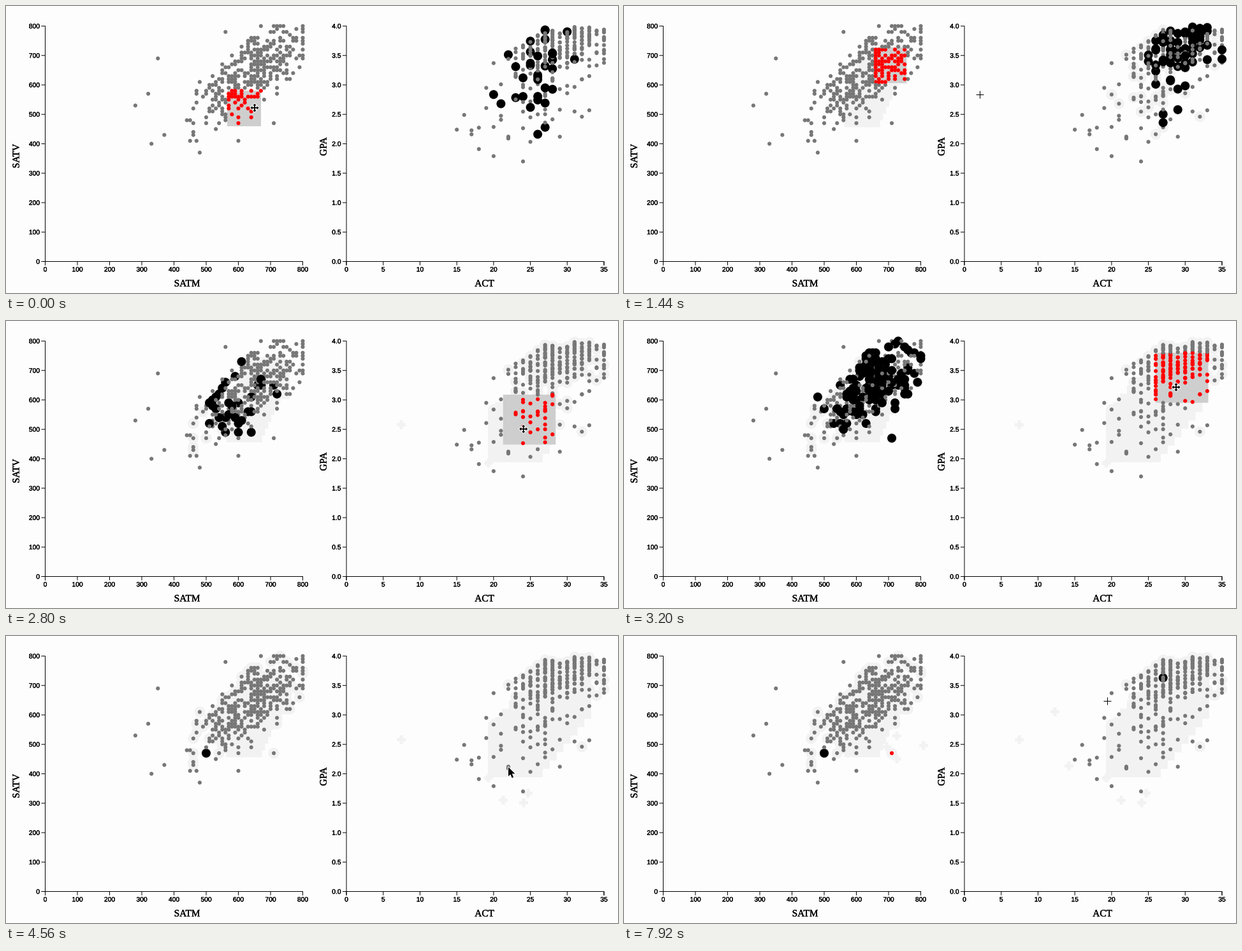
A matplotlib script for the animation above (8000 ms loop, 960x451 px).

```python
import numpy as np
import matplotlib.pyplot as plt
from matplotlib.animation import FuncAnimation
from matplotlib.collections import LineCollection, PolyCollection
from matplotlib.patheffects import withStroke

W, H, DPI = 960, 451, 100
FRAMES, STEP = 100, 80
PT = 72 / DPI
GRAY, RED, BLACK, GHOST, BRUSH = "#777777", "#ff0000", "#000000", "#f2f2f2", "#cecece"
TOP, BOTTOM, SPAN = 31.5, 401.5, 404
LEFT_X, RIGHT_X = 61.5, 534
plt.rcParams["text.hinting"] = "no_hinting"

# ---- data: satm, satv, act, gpa; the first three get hovered ----
KEY_STUDENTS = [
    (500, 470, 22, 2.10), (720, 570, 30, 3.67), (710, 470, 27, 3.63),
    (280, 530, 15, 2.24), (320, 570, 16, 2.49), (330, 400, 17, 2.16), (370, 430, 18, 1.91),
    (350, 690, 20, 3.37), (480, 370, 20, 1.79), (450, 410, 24, 1.70), (600, 410, 29, 2.12),
    (560, 780, 34, 3.54), (640, 490, 27, 2.28), (650, 670, 32, 2.46), (760, 620, 33, 3.15),
]


def students(n, seed=4):
    """Test scores and grades that share one latent ability."""
    rng = np.random.default_rng(seed)
    z, a, b, c = rng.normal(size=(4, 2 * n))
    z = np.where(z < 0, 1.2 * z, z)
    sat = 635 + 85 * (0.83 * z + 0.56 * np.array([a, b]))
    satm, satv = np.minimum(800, sat.round(-1))
    act = np.minimum(35, (28.3 + 3.7 * (0.85 * z + 0.5 * c)).round())
    cap = np.minimum(4, 3.37 + 0.085 * (act - 20))
    gpa = cap - rng.gamma(1.6, 0.3, 2 * n) * np.exp(-0.25 * z)
    ok = (satm >= 430) & (satv >= 410) & (abs(satm - satv) < 140) & (act >= 17) & (gpa > 2)
    rows = np.column_stack([satm, satv, act, gpa])[ok]
    first = np.unique(rows[:, :2], axis=0, return_index=True)[1]
    return rows[np.sort(first)][:n]


def to_px(x, y, x0, xmax, ymax):
    return np.column_stack([x0 + x / xmax * SPAN, BOTTOM - y / ymax * (BOTTOM - TOP)])


rec = np.vstack([KEY_STUDENTS, students(275)])
dots = [to_px(rec[:, 0], rec[:, 1], LEFT_X, 800, 800),
        to_px(rec[:, 2], rec[:, 3], RIGHT_X, 35, 4)]

# ---- motion: time, x, y of the pointer ----
PATH = np.array([
    (0, 390, 160), (560, 424, 85), (880, 433, 92), (1120, 433, 92), (1600, 620, 163),
    (1760, 757, 223), (2160, 838, 145), (2480, 844, 139), (2640, 790, 196), (3200, 866, 104),
    (3520, 866, 104), (3760, 819, 247), (3920, 812, 262), (4160, 780, 258), (4400, 788, 206),
    (4720, 788, 206), (5120, 698, 204), (5680, 470, 172), (5960, 425, 138), (6240, 425, 138),
    (6480, 428, 157), (7040, 428, 193), (7440, 412, 174), (7600, 420, 184), (7760, 420, 184),
    (7840, 676, 119), (7920, 758, 102),
])
LEFT_END, GROW, GROW_END, DRAG, DRAG_END, CLEAR = 880, 1760, 2480, 2640, 3520, 3840
HOVERS = [(4400, 4720), (5960, 6240), (7600, 7800)]


def pointer(t):
    return np.array([np.interp(t, PATH[:, 0], PATH[:, i]) for i in (1, 2)])


def pointer_kind(t):
    if t < 480 or DRAG <= t < DRAG_END + STEP:
        return "move"
    x, y = pointer(t)
    inside = TOP < y < BOTTOM and (LEFT_X < x < LEFT_X + SPAN + 10 or x > RIGHT_X)
    hover = any(a <= t < b for a, b in HOVERS)
    return "plus" if inside and not hover and t > 1200 else "arrow"


def brush(t):
    """Panel, top left and bottom right of the active brush."""
    if t < GROW:
        shift = pointer(min(t, LEFT_END)) - pointer(0)
        return 0, np.array([347, 133]) + shift, np.array([400, 189]) + shift
    if t < CLEAR:
        x, y = pointer(min(t, GROW_END)) + (-3.5, 3)
        shift = pointer(min(t, DRAG_END)) - pointer(DRAG) if t > DRAG else 0
        lo, hi = np.sort([(758, 220.5), (x, y)], axis=0)
        return 1, lo + shift, hi + shift
    return None


def box(lo, hi, pad=0):
    (x0, y0), (x1, y1) = lo - pad, hi + pad
    return [(x0, y0), (x1, y0), (x1, y1), (x0, y1)]


def cross(x, y, r):
    return [[(x - r, y), (x + r, y)], [(x, y - r), (x, y + r)]]


def build_states():
    """State per step; faint ghosts stay where brush and big dots have been."""
    states, trail = [], []
    seen = np.zeros((2, len(rec)), bool)
    for t in np.arange(FRAMES) * STEP:
        red, big = np.zeros((2, 2, len(rec)), bool)
        ghosts, verts = list(trail), []
        active = brush(t)
        if active:
            side, lo, hi = active
            hit = ((dots[side] >= lo) & (dots[side] <= hi)).all(axis=1)
            red[side], big[1 - side] = hit, hit
            verts = [box(lo, hi)]
            trail.append(box(lo, hi, 1.5))
        if t >= HOVERS[0][0]:
            red[1, 0] = big[0, 0] = True
        if t >= HOVERS[1][0]:
            i = 1 if t < HOVERS[2][0] + STEP else 2
            red[0, i] = big[1, i] = True
        states.append((t, verts, red, big, seen.copy(), ghosts))
        seen |= big
    return states


states = build_states()
MARKS = [p for p in PATH if pointer_kind(p[0]) == "plus" and not GROW < p[0] < DRAG]

# ---- stage ----
fig = plt.figure(figsize=(W / DPI, H / DPI), dpi=DPI, facecolor="#fdfdfd")
ax = fig.add_axes([0, 0, 1, 1])
ax.set(xlim=(0, W), ylim=(H, 0))
ax.axis("off")


def area(r):
    return (2 * r * PT) ** 2


def label(x, y, s, px, font, **kw):
    ax.text(x, y, s, fontsize=px * PT, fontname=font, color="black", zorder=3,
            path_effects=[withStroke(linewidth=0.25, foreground="black")], **kw)


def add(art):
    art.set_snap(False)
    return ax.add_collection(art)


def draw_axes(x0, xs, xmax, ys, ymax, fmt):
    x1 = x0 + SPAN
    lines = [[(x0, BOTTOM + 6), (x0, BOTTOM), (x1, BOTTOM), (x1, BOTTOM + 6)],
             [(x0 - 6, TOP), (x0, TOP), (x0, BOTTOM), (x0 - 6, BOTTOM)]]
    for v in xs:
        x = x0 + v / xmax * SPAN
        lines.append([(x, BOTTOM), (x, BOTTOM + 6)])
        label(x, 417.3, str(v), 10.3, "Liberation Sans", ha="center", va="baseline")
    for v in ys:
        y = BOTTOM - v / ymax * (BOTTOM - TOP)
        lines.append([(x0 - 6, y), (x0, y)])
        label(x0 - 8.5, y + 3.6, fmt.format(v), 10.3, "Liberation Sans",
              ha="right", va="baseline")
    add(LineCollection(lines, colors="black", linewidths=PT, zorder=3))


draw_axes(LEFT_X, range(0, 801, 100), 800, range(0, 801, 100), 800, "{}")
draw_axes(RIGHT_X, range(0, 36, 5), 35, np.arange(0, 4.1, 0.5), 4, "{:.1f}")
for x, y, s, turn in [(284, 437, "SATM", 0), (750.5, 437, "ACT", 0),
                      (17, 236, "SATV", 90), (499, 221, "GPA", 90)]:
    label(x, y, s, 15.3, "Liberation Serif", rotation=turn, ha="center", va="center")

trail_art = add(PolyCollection([], facecolors=GHOST, edgecolors="none", zorder=1))
brush_art = add(PolyCollection([], facecolors=BRUSH, edgecolors="none", zorder=2))
mark_art = add(LineCollection([], colors=GHOST, linewidths=5 * PT, zorder=1))
cross_art = add(LineCollection([], colors="black", linewidths=PT, zorder=6))
# the same outline twice: white rim, then black body
shape_art = add(PolyCollection([], facecolors=["white", "black"], edgecolors=["white", "none"],
                               linewidths=[2 * PT, 0], zorder=6))
halo_art = [ax.scatter(*d.T, s=0, c=GHOST, linewidths=0, zorder=1, snap=False) for d in dots]
dot_art = [ax.scatter(*d.T, s=area(3.1), c=GRAY, linewidths=0, zorder=4, snap=False)
           for d in dots]

ARROW = np.array([(0, 0), (0, 14.5), (3.3, 11.4), (5.7, 17), (8.1, 16), (5.8, 10.4), (10.4, 10.4)])
ARM = np.array([(-.9, -.9), (-.9, -3.6), (-2.8, -3.6), (0, -6.6), (2.8, -3.6), (.9, -3.6)])
TURN = np.array([(0, 1), (-1, 0)])
MOVE = np.vstack([ARM @ np.linalg.matrix_power(TURN, k) for k in range(4)])
SHAPES = {"arrow": [ARROW] * 2, "move": [MOVE] * 2, "plus": []}


def update(k):
    t, verts, red, big, seen, ghosts = states[k]
    trail_art.set_verts(ghosts)
    brush_art.set_verts(verts)
    mark_art.set_segments([s for m, x, y in MARKS if t > m for s in cross(x, y, 7)])
    for p in range(2):
        halo_art[p].set_sizes(np.where(seen[p], area(8.5), 0))
        dot_art[p].set_sizes(np.where(big[p], area(7), area(3.1)))
        dot_art[p].set_facecolors(np.where(big[p], BLACK, np.where(red[p], RED, GRAY)))
    kind, at = pointer_kind(t), pointer(t)
    cross_art.set_segments(cross(*(at.round() + 0.5), 6) if kind == "plus" else [])
    shape_art.set_verts([s + at for s in SHAPES[kind]])
    return []


anim = FuncAnimation(fig, update, frames=FRAMES, interval=STEP, repeat=True, repeat_delay=0)
plt.show()
```
